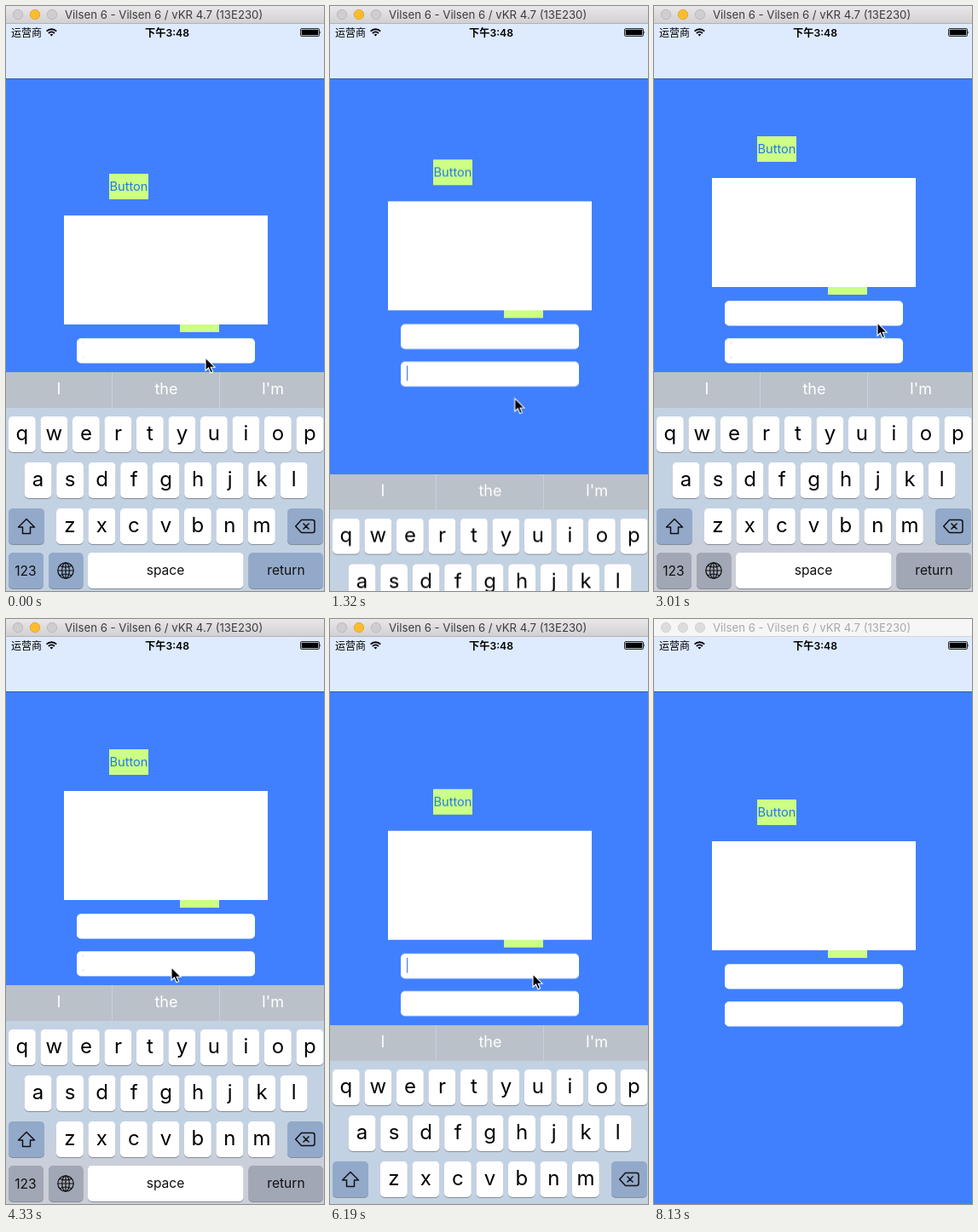
An HTML page for the animation above (8230 ms loop, 373 by 687 pixels).

```html
<!DOCTYPE html>
<html lang="en">
<head>
<meta charset="utf-8">
<title>Keyboard avoidance</title>
<style>
  html, body { margin: 0; width: 100%; height: 100%; overflow: hidden; background: #4080ff; }
  svg { display: block; width: 373px; height: 687px; font-family: Inter, Roboto, sans-serif; }
  .cjk { font-family: "Noto Sans CJK SC", "Noto Sans CJK", sans-serif; }
  .mid { text-anchor: middle; }
  .crisp { shape-rendering: crispEdges; }
  .line { fill: none; stroke: #111; stroke-width: 1.5; }
  .field { fill: #fff; }

  #content, #keyboard, #tint, #pointer, .loop {
    animation: 8.23s linear infinite;
  }
  #content, #keyboard, #tint { animation-timing-function: cubic-bezier(.38, .7, .125, 1); }
  #content { animation-name: avoid; }
  #keyboard { animation-name: slide; }
  #tint { animation-name: tint; }
  #pointer { animation-name: point; animation-timing-function: ease-in-out; }
  #inactive { animation-name: deactivate; }
  #focus1 { animation-name: focus1; }
  #focus2 { animation-name: focus2; }
  #caret1 { animation-name: blink1; }
  #caret2 { animation-name: blink2; }

  @keyframes avoid {
    0%, 4.86% { transform: translateY(-15px); }
    10.94%, 14.7% { transform: translateY(0); }
    20.78%, 58.2% { transform: translateY(-59px); }
    64.28%, 73.09% { transform: translateY(0); }
    79.16%, 84.78% { transform: translateY(-15px); }
    90.85%, 100% { transform: translateY(0); }
  }
  @keyframes slide {
    0%, 4.86% { transform: translateY(430px); }
    10.94%, 14.7% { transform: translateY(688px); }
    20.78%, 58.2% { transform: translateY(430px); }
    64.28%, 73.09% { transform: translateY(688px); }
    79.16%, 84.78% { transform: translateY(430px); }
    90.85%, 100% { transform: translateY(688px); }
  }
  @keyframes tint {
    0%, 14.7% { opacity: 0; }
    20.78%, 58.2% { opacity: 1; }
    64.28%, 100% { opacity: 0; }
  }
  @keyframes point {
    0%, .24% { transform: translate(234px, 413px); }
    4.01%, 7.29% { transform: translate(312px, 415px); }
    10.09% { transform: translate(236px, 447px); }
    12.88%, 15.07% { transform: translate(216px, 462px); }
    22.24% { transform: translate(236px, 427px); }
    24.79% { transform: translate(262px, 407px); }
    29.16% { transform: translate(313px, 364px); }
    34.51%, 36.57% { transform: translate(262px, 372px); }
    40.1% { transform: translate(225px, 351px); }
    44.35%, 52.61% { transform: translate(194px, 409px); }
    56.74%, 60.15% { transform: translate(323px, 410px); }
    67.92%, 69.38% { transform: translate(240px, 420px); }
    75.21%, 79.47% { transform: translate(238px, 417px); }
    82.38%, 85.05% { transform: translate(340px, 420px); }
    86.27% { transform: translate(333px, 462px); }
    93.56%, 100% { transform: translate(322px, 692px); }
  }
  @keyframes deactivate {
    0%, 98.77% { opacity: 0; }
    98.78%, 100% { opacity: 1; }
  }
  @keyframes focus1 {
    0%, 4.86% { opacity: 1; }
    4.87%, 73.08% { opacity: 0; }
    73.09%, 84.78% { opacity: 1; }
    84.79%, 100% { opacity: 0; }
  }
  @keyframes focus2 {
    0%, 14.69% { opacity: 0; }
    14.7%, 58.2% { opacity: 1; }
    58.21%, 100% { opacity: 0; }
  }
  @keyframes blink1 {
    0%, 73.08% { opacity: 0; }
    73.09%, 80.92% { opacity: 1; }
    82.38%, 100% { opacity: 0; }
  }
  @keyframes blink2 {
    0%, 14.69% { opacity: 0; }
    14.7%, 20.66% { opacity: 1; }
    22.11%, 28.31% { opacity: 0; }
    29.77%, 32.81% { opacity: 1; }
    34.26%, 40.46% { opacity: 0; }
    41.92%, 44.96% { opacity: 1; }
    46.42%, 52.61% { opacity: 0; }
    54.07%, 57.11% { opacity: 1; }
    58.08%, 100% { opacity: 0; }
  }
</style>
</head>
<body>
<svg viewBox="0 0 373 687">
  <defs>
    <linearGradient id="chrome" x2="0" y2="1">
      <stop stop-color="#e9e7e9"/><stop offset="1" stop-color="#d2d0d2"/>
    </linearGradient>
    <linearGradient id="fade" x2="0" y2="1">
      <stop stop-color="#cbced7" stop-opacity="0"/>
      <stop offset=".65" stop-color="#cbced7"/>
    </linearGradient>
  </defs>

  <rect width="373" height="687" fill="#4080ff"/>

  <g id="content">
    <rect x="121" y="212" width="46" height="30" fill="#ccff85"/>
    <text class="mid" x="144" y="232.3" font-size="14.6" fill="#1f78f2">Button</text>
    <rect x="204" y="368" width="46" height="30" fill="#ccff85"/>
    <rect x="68" y="261" width="239" height="128" fill="#fff"/>
    <rect class="field" x="83" y="405.3" width="209" height="29.2" rx="5"/>
    <rect class="field" x="83" y="449.3" width="209" height="29.2" rx="5"/>
    <g id="focus1" class="loop crisp">
      <path d="M90 410h1v1h-1zM90 427h1v1h-1z" fill="#ccc"/>
      <rect id="caret1" class="loop" x="90" y="410" width="1" height="18" fill="#4672d8"/>
    </g>
    <g id="focus2" class="loop crisp">
      <path d="M90 454h1v1h-1zM90 471h1v1h-1z" fill="#bbb"/>
      <rect id="caret2" class="loop" x="90" y="454" width="1" height="18" fill="#4672d8"/>
    </g>
  </g>

  <rect y="20" width="373" height="65" fill="#deebff"/>
  <rect y="85" width="373" height="1" fill="#2c5cae"/>
  <text class="cjk" x="6" y="35.5" font-size="12">运营商</text>
  <g fill="none" stroke="#000" stroke-width="1.9">
    <path d="M47.6 29.6a8.2 8.2 0 0 1 11.6 0M49.9 32a5 5 0 0 1 7 0"/>
    <path d="M53.4 35.6l-1.9-2a2.7 2.7 0 0 1 3.8 0z" fill="#000" stroke="none"/>
  </g>
  <text class="cjk mid" x="189" y="35.5" font-size="12.2" font-weight="700">下午<tspan font-family="Inter, sans-serif" font-weight="600">3:48</tspan></text>
  <rect x="345.5" y="26.5" width="22" height="9" rx="1.5" fill="none" stroke="#000" stroke-width=".8"/>
  <rect x="346.7" y="27.7" width="19.6" height="6.6" rx=".6"/>
  <path d="M368.3 29.2q1.6 1.8 0 3.6z"/>

  <rect width="373" height="20" fill="url(#chrome)"/>
  <rect y="20" width="373" height="1" fill="#b4b2b6"/>
  <g stroke-width=".8">
    <circle cx="14" cy="10" r="5.7" fill="#cfcdcf" stroke="#b5b3b5"/>
    <circle cx="34" cy="10" r="5.7" fill="#fdbc2e" stroke="#dfa023"/>
    <circle cx="54" cy="10" r="5.7" fill="#cfcdcf" stroke="#b5b3b5"/>
  </g>
  <text x="69" y="15" font-size="13.2" fill="#3d3d3d">Vilsen 6 - Vilsen 6 / vKR 4.7 (13E230)</text>
  <g id="inactive" class="loop">
    <rect width="373" height="20" fill="#f6f6f6"/>
    <rect y="20" width="373" height="1" fill="#d4d4d6"/>
    <g fill="#dcdcdc" stroke="#cfcfcf" stroke-width=".8">
      <circle cx="14" cy="10" r="5.7"/><circle cx="34" cy="10" r="5.7"/><circle cx="54" cy="10" r="5.7"/>
    </g>
    <text x="69" y="15" font-size="13.2" fill="#a9a9a9">Vilsen 6 - Vilsen 6 / vKR 4.7 (13E230)</text>
  </g>

  <g id="keyboard">
    <rect width="373" height="258" fill="#c3d2e3"/>
    <rect width="373" height="42" fill="#bac1c9"/>
    <path class="crisp" d="M124 0h1v42h-1zM250 0h1v42h-1z" fill="#c6d0e0"/>
    <g class="mid" font-size="18" fill="#fff">
      <text x="62" y="26">I</text><text x="188" y="26">the</text><text x="313" y="26">I'm</text>
    </g>
    <g id="darkKeys"></g>
    <g id="tint">
      <rect y="160" width="373" height="98" fill="url(#fade)"/>
      <g id="tintKeys"></g>
    </g>
    <g id="lightKeys"></g>
    <g class="line" stroke-linejoin="round">
      <path d="M24 172.500l-9.500 9.500h5v7.500h9v-7.500h5z"/>
      <path d="M346.500 173.500h13q2.500 0 2.500 2.500v10q0 2.500-2.500 2.500h-13l-6.800-7.500zM348.500 177.500l7 7m0-7l-7 7"/>
      <g stroke-width="1.200">
        <circle cx="70" cy="233" r="9.200"/>
        <ellipse cx="70" cy="233" rx="4.300" ry="9.200"/>
        <path d="M70 223.800v18.400M60.800 233h18.400M63 227.200q7 3.600 14 0M63 238.800q7-3.600 14 0"/>
      </g>
    </g>
    <g class="mid" font-size="15.600" fill="#111">
      <text x="23" y="238.500">123</text>
      <text x="187" y="237.500">space</text>
      <text x="328.500" y="237.500">return</text>
    </g>
  </g>

  <path id="pointer" d="M0 0V15.200L3.500 12L6 17.700L8.600 16.600L6.200 11.200H11Z" stroke="#fff" stroke-width="1.100"/>
</svg>
<script>
  const key = (x, y, width, fill) =>
    `<rect x="${x}" y="${y + 1}" width="${width}" height="42" rx="4.8" fill="#858c96"/>` +
    `<rect x="${x}" y="${y}" width="${width}" height="42" rx="4.8" fill="${fill}"/>`;

  const letterRow = (letters, left, y) => [...letters].map((letter, i) => {
    const x = left + i * 37.5;
    return key(x, y, 31.8, '#fff') +
      `<text class="mid" x="${x + 15.9}" y="${y + 27.5}" font-size="24">${letter}</text>`;
  }).join('');

  const bottomKeys = fill => key(3, 212, 41, fill) + key(50, 212, 40.5, fill) + key(284.5, 212, 87.5, fill);
  const fillGroup = (id, markup) => { document.getElementById(id).innerHTML = markup; };

  const blue = '#93a9ca';
  fillGroup('darkKeys', bottomKeys(blue));
  fillGroup('tintKeys', bottomKeys('#a1a7b5'));
  fillGroup('lightKeys',
    letterRow('qwertyuiop', 3, 52) +
    letterRow('asdfghjkl', 21.7, 106) +
    letterRow('zxcvbnm', 59, 160) +
    key(3, 160, 42, blue) + key(330, 160, 42, blue) +
    key(96, 212, 182.5, '#fff'));
</script>
</body>
</html>
```
